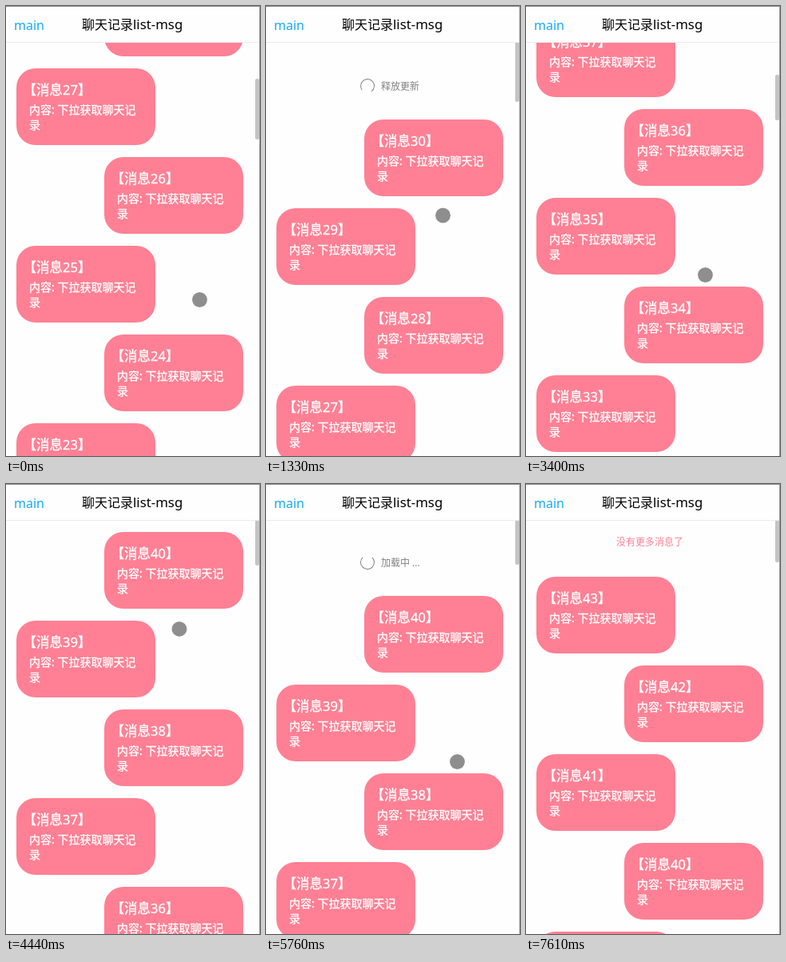
An HTML page that plays this animation: 318 by 563 pixels, repeating every 7.98 s.

```html
<!DOCTYPE html>
<html lang="zh-CN">
<head>
<meta charset="utf-8">
<title>聊天记录</title>
<style>
html, body { margin: 0; width: 100%; height: 100%; overflow: hidden; background: #fefefe; }
body { position: relative; font: 16px/20px "Noto Sans", "Noto Sans CJK SC", "Noto Sans CJK", sans-serif; }
div, span { position: absolute; box-sizing: border-box; white-space: nowrap; }
#list, #tip, #end, #cursor { left: 0; top: 0; }
.card { width: 174px; height: 96px; border-radius: 24px; background: #ff8094; color: #fff; -webkit-text-stroke: .3px #fff; }
.card b { position: absolute; left: 8.5px; top: 17px; font-weight: 400; font-size: 16.5px; }
.card p { position: absolute; left: 16px; top: 42px; margin: 0; font-size: 14px; line-height: 19px; }
#tip { color: #808080; font-size: 12px; }
#ring { left: 118px; top: -9px; width: 18px; height: 18px; border: 1px solid #808080; border-bottom-color: transparent; border-radius: 50%; }
#label { left: 144px; top: -9px; }
#end { left: 113px; color: #ff8094; font-size: 12px; }
#head { left: 0; top: 0; width: 100%; height: 46px; background: #fefefe; border-top: 1px solid #8c8c8c; border-bottom: 1px solid #ebebeb; }
#head span { top: 12px; }
#thumb { left: 312px; width: 5px; border-radius: 2px; background: #c4c4c4; }
#edge { right: 0; top: 0; width: 1px; height: 100%; background: #a0a0a0; }
#cursor { width: 23px; height: 23px; margin: -11.5px; border-radius: 50%; background: rgba(0,0,0,.44); background-clip: padding-box; border: 2px solid rgba(255,255,255,.4); }
</style>
</head>
<body>
<div id="list"></div>
<div id="tip"><div id="ring"></div><span id="label"></span></div>
<div id="end">没有更多消息了</div>
<div id="thumb"></div>
<div id="head">
  <span style="left:10px;top:13px;color:#14aaf8">main</span>
  <span style="left:95px;color:#000">聊天记录</span>
  <span style="left:159px;color:#000;font-size:16.8px">list-msg</span>
</div>
<div id="edge"></div>
<div id="cursor"></div>
<script>
const $ = id => document.getElementById(id);
const LOOP = 7980, PITCH = 111, VIEW = 518;
const OFFSET = 80, DRAG = 175, LOADING = 1010, SETTLE = 300;
const counts = [30, 40, 43], TOTAL = counts[2];

// One refresh per drag; flings scroll up to the top within a stage.
const drags = [{ start: 1080, drop: 1580 }, { start: 4760, drop: 5460 }];
const flings = [
  { stage: 0, start: 260, by: 315 },
  { stage: 1, start: 3100, by: 735 },
  { stage: 1, start: 3600, by: 375 },
  { stage: 2, start: 6570, by: 389 }
];
// Cursor moves: start, end, x, y
const legs = [
  [570, 1080, 218, 186], [1080, 1580, 224, 336], [4100, 4560, 215, 150],
  [4760, 5460, 222, 325], [5460, 5760, 239, 347], [7250, 7610, 250, 590]
];

const part = (t, a, b) => Math.min(1, Math.max(0, (t - a) / (b - a)));
const smooth = (t, a, b) => { const u = part(t, a, b); return u * u * (3 - 2 * u); };
const easeOut = (t, a) => 1 - (1 - part(t, a, a + SETTLE)) ** 2;
const move = (el, x, y) => el.style.transform = `translate(${x}px,${y}px)`;

// Beyond the offset the list resists the finger; after the drop it settles, loads and closes.
function pullOf(t, { start, drop }) {
  const finger = DRAG * smooth(t, start, drop);
  const pulled = finger < OFFSET ? finger : OFFSET + (finger - OFFSET) * .2;
  const held = pulled + (OFFSET - pulled) * easeOut(t, drop);
  return held * (1 - easeOut(t, drop + LOADING));
}

const cards = Array.from({ length: TOTAL }, (_, i) => {
  const n = TOTAL - i, card = document.createElement('div');
  card.className = 'card';
  card.style.left = (n % 2 ? 13 : 123) + 'px';
  card.style.top = i * PITCH + 'px';
  card.innerHTML = `<b>【消息${n}】</b><p>内容: 下拉获取聊天记<br>录</p>`;
  $('list').append(card);
  return card;
});

function draw(t) {
  const stage = drags.filter(d => t >= d.drop + LOADING).length;
  const count = counts[stage], unseen = TOTAL - count, done = !unseen;
  const pull = drags.reduce((sum, d) => sum + pullOf(t, d), 0);
  const scroll = flings.filter(f => f.stage === stage)
    .reduce((sum, f) => sum + f.by * (1 - smooth(t, f.start, f.start + SETTLE)), 0);
  const first = Math.round((done ? 116 : 60) + pull - scroll);

  cards.forEach((c, i) => c.hidden = i < unseen);
  move($('list'), 0, first - unseen * PITCH);

  const load = drags.find(d => t >= d.drop && t < d.drop + LOADING);
  const turn = load ? (t - load.drop) / 600 : pull / OFFSET;
  $('tip').hidden = done;
  $('label').textContent = load ? '加载中 ...' : pull < OFFSET ? '下拉刷新' : '释放更新';
  $('ring').style.transform = `rotate(${turn}turn)`;
  move($('tip'), 0, first - 42);
  $('end').hidden = !done;
  move($('end'), 0, first - 53);

  const height = 118 * count + pull;
  $('thumb').style.top = 45 + Math.max(0, scroll - pull) / height * VIEW + 'px';
  $('thumb').style.height = Math.ceil(VIEW * VIEW / height) + 'px';

  let x = 242, y = 367;
  for (const [a, b, toX, toY] of legs) {
    const u = smooth(t, a, b);
    x += (toX - x) * u;
    y += (toY - y) * u;
  }
  move($('cursor'), x, y);
}

const begin = performance.now();
function frame() {
  draw((performance.now() - begin) % LOOP);
  requestAnimationFrame(frame);
}
frame();
</script>
</body>
</html>
```
